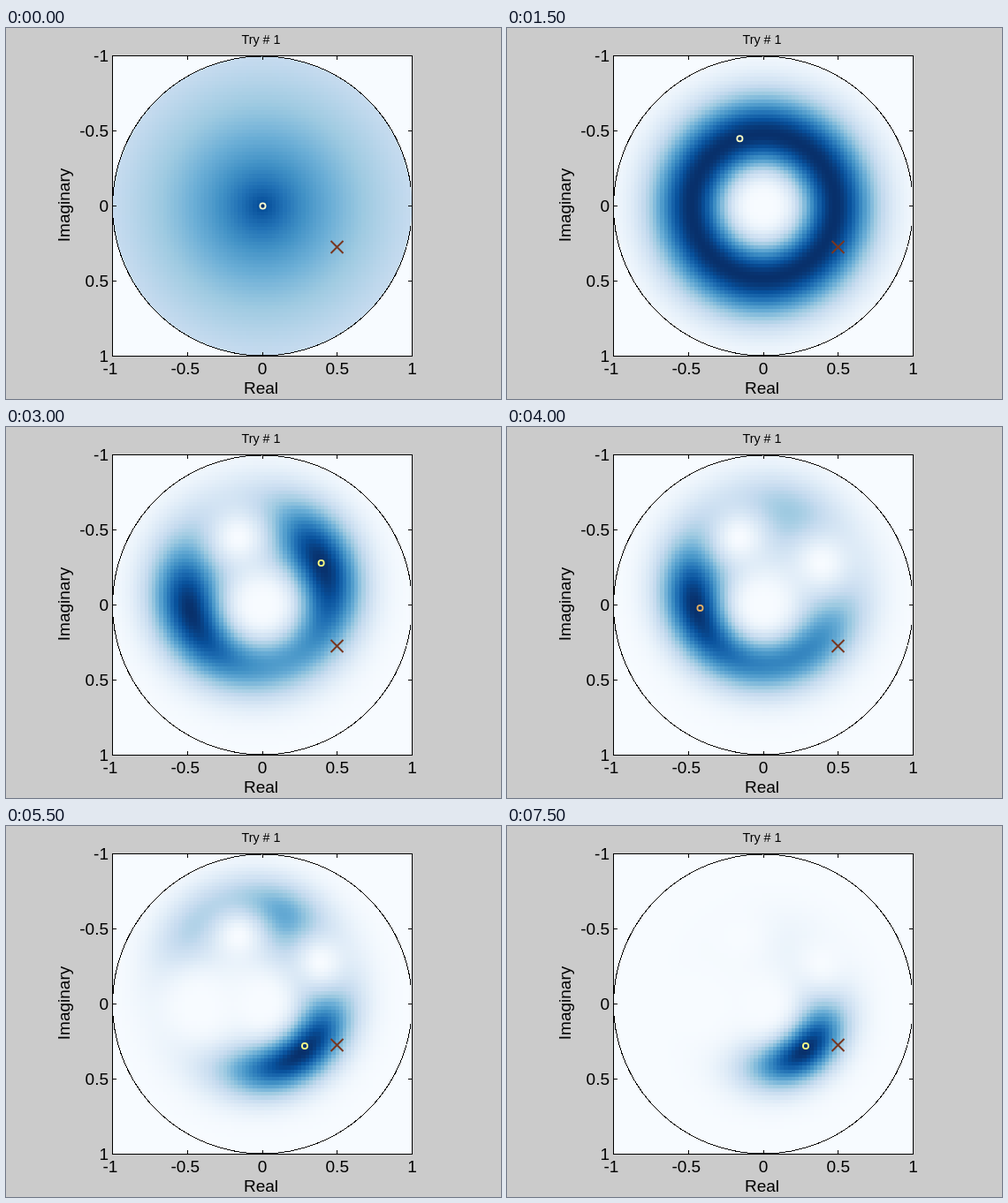
An HTML page with a canvas for the animation above (8000 ms loop, 560 by 420 pixels).

```html
<!DOCTYPE html>
<html lang="en">
<head>
<meta charset="utf-8">
<title>Adaptive estimate</title>
<style>
  html, body { margin: 0; width: 100%; height: 100%; overflow: hidden; background: #cbcbcb; }
  canvas, svg { position: absolute; left: 0; top: 0; }
  text { font: 19px "Liberation Sans", Arial, sans-serif; text-anchor: middle; }
  .title { font-size: 14.3px; }
  .ylabel { text-anchor: end; }
  .line { fill: none; stroke: #000; shape-rendering: crispEdges; }
</style>
</head>
<body>
<canvas id="map" width="560" height="420"></canvas>
<svg width="560" height="420" viewBox="0 0 560 420">
  <clipPath id="inside"><rect x="120" y="31" width="338" height="341"/></clipPath>
  <circle class="line" cx="290" cy="201.5" r="169.5" clip-path="url(#inside)"/>
  <rect class="line" x="120.5" y="31.5" width="339" height="340"/>
  <path id="ticks" class="line"/>
  <path d="M367.5 241l14 14m0-14l-14 14" stroke="#783620" stroke-width="2"/>
  <circle id="probe" r="3.1" fill="none" stroke-width="1.8"/>
  <g id="labels"></g>
  <text class="title" x="288.5" y="18">Try # 1</text>
  <text x="288.5" y="414">Real</text>
  <text transform="translate(72 200.5) rotate(-90)">Imaginary</text>
</svg>
<script>
const CELLS = 81, STEP = 500, CX = 290, CY = 201.5, HALF = 169.5;
const BLUES = ['f7fbff', 'deebf7', 'c6dbef', '9ecae1', '6baed6', '4292c6', '2171b5', '08519c', '08306b']
  .map(h => [0, 2, 4].map(i => parseInt(h.slice(i, i + 2), 16)));

const probes = [
  { x: 0, y: 0, color: '#ffffd2' },
  { x: -0.16, y: -0.45, color: '#ffffc4' },
  { x: 0.39, y: -0.28, color: '#ffff80' },
  { x: -0.425, y: 0.02, color: '#e6b062' },
  { x: 0.28, y: 0.28, color: '#ffff88' }
];
// Each measurement: probe index, counts seen, strength
const events = [
  [0, 0, 1.3], [0, 0, 1.3], [0, 2, 4.7],
  [1, 0, 0.95], [1, 0, 0.95], [1, 1, 1],
  [2, 0, 1], [2, 1, 1],
  [3, 0, 1.05], [3, 0, 1.05], [3, 2, 1.3],
  [4, 0, 1.2], [4, 0, 1.2], [4, 0, 0.6], [4, 0, 0.6]
];

const ctx = document.getElementById('map').getContext('2d');
const grid = document.createElement('canvas');
grid.width = grid.height = CELLS;
const gridCtx = grid.getContext('2d');
const marker = document.getElementById('probe');

function density(x, y, count) {
  const r = Math.hypot(x, y);
  let p = Math.exp(-1.3 * r) + (r < 0.01 ? 0.1 : 0);
  for (const [i, n, k] of events.slice(0, count)) {
    const d2 = (x - probes[i].x) ** 2 + (y - probes[i].y) ** 2;
    p *= d2 ** n * Math.exp(-k * d2);
  }
  return p;
}

function shade(v) {
  const s = v * 8, i = Math.min(7, Math.floor(s));
  return BLUES[i].map((c, j) => c + (BLUES[i + 1][j] - c) * (s - i));
}

function drawMap(count) {
  const values = Array.from({ length: CELLS * CELLS }, (_, i) => {
    const x = (i % CELLS) / 40 - 1, y = Math.floor(i / CELLS) / 40 - 1;
    return Math.hypot(x, y) < 1.04 ? density(x, y, count) : 0;
  });
  const max = Math.max(...values);
  const img = gridCtx.createImageData(CELLS, CELLS);
  values.forEach((v, i) => img.data.set([...shade(v / max), 255], i * 4));
  gridCtx.putImageData(img, 0, 0);

  ctx.fillStyle = '#f7fbff';
  ctx.fillRect(120, 31, 340, 341);
  ctx.save();
  ctx.beginPath();
  ctx.arc(CX, CY, HALF, 0, 7);
  ctx.clip();
  ctx.imageSmoothingEnabled = false;
  const cell = HALF / 40, size = cell * CELLS;
  ctx.drawImage(grid, CX - size / 2, CY - size / 2, size, size);
  ctx.restore();
}

function drawProbe(p) {
  marker.setAttribute('cx', CX + 0.5 + p.x * HALF);
  marker.setAttribute('cy', CY + p.y * HALF);
  marker.setAttribute('stroke', p.color);
}

function drawAxes() {
  let ticks = '', labels = '';
  ['-1', '-0.5', '0', '0.5', '1'].forEach((name, i) => {
    const x = 120.5 + i * 84.75, y = 31.5 + i * 85;
    const shift = name[0] === '-' ? -2.5 : 0;
    ticks += `M${x} 31v5M${x} 372v-5M120 ${y}h5M460 ${y}h-5`;
    labels += `<text x="${x + shift}" y="392">${name}</text>` +
      `<text class="ylabel" x="116" y="${y + 6.5}">${name}</text>`;
  });
  document.getElementById('ticks').setAttribute('d', ticks);
  document.getElementById('labels').innerHTML = labels;
}

let shown = -1;
function tick(now) {
  const step = Math.floor((now % (STEP * 16)) / STEP);
  if (step !== shown) {
    shown = step;
    drawMap(step);
    drawProbe(probes[(events[step] || [4])[0]]);
  }
  requestAnimationFrame(() => tick(performance.now() - start));
}

drawAxes();
const start = performance.now();
tick(0);
</script>
</body>
</html>
```
